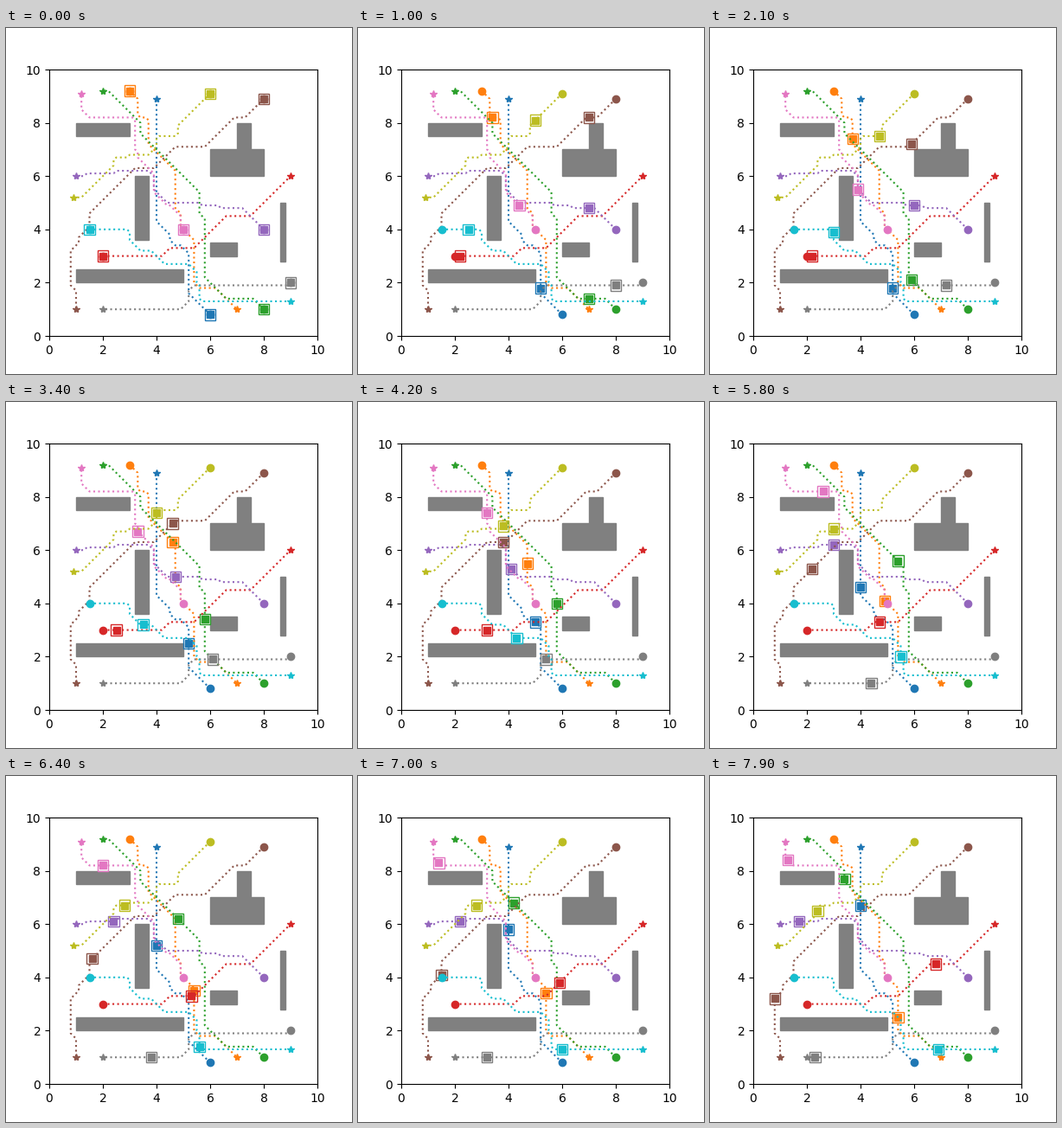
Animation, 400 px wide and 400 px high, one loop 8 s. Source, as a matplotlib script:

```python
import numpy as np
import matplotlib.pyplot as plt
from matplotlib.animation import FuncAnimation
from matplotlib.patches import Rectangle

FRAMES = 80
INTERVAL = 100
CELL = 0.1    # robots move one grid cell per frame
BOX = 0.4

fig, ax = plt.subplots(figsize=(4, 4), dpi=100)
ax.set_xlim(0, 10)
ax.set_ylim(0, 10)

for x, y, w, h in [(1, 7.5, 2, 0.5), (6, 6, 2, 1), (7, 7, 0.5, 1),
                   (3.2, 3.6, 0.5, 2.4), (1, 2, 4, 0.5),
                   (6, 3, 1, 0.5), (8.6, 2.8, 0.2, 2.2)]:
    ax.add_patch(Rectangle((x, y), w, h, color="gray"))


def route(points):
    """Grid cells through the points: diagonal first, then straight."""
    corners = np.rint(np.array(points) / CELL).astype(int)
    cells = [corners[0]]
    for corner in corners[1:]:
        while (cells[-1] != corner).any():
            cells.append(cells[-1] + np.sign(corner - cells[-1]))
    return np.array(cells) * CELL


class Robot:
    """Follows its route, pausing as told by holds: {cell index: frames}."""

    def __init__(self, color, points, holds):
        self.path, self.holds = route(points), holds
        ax.plot(*self.path.T, ":", color=color)
        ax.plot(*self.path[0], "o", color=color)
        ax.plot(*self.path[-1], "*", color=color)
        self.box = ax.add_patch(Rectangle((0, 0), BOX, BOX, fill=False,
                                          edgecolor=color, lw=1, zorder=2))
        self.core, = ax.plot([], [], "s", color=color)

    def move(self, frame):
        step = frame
        for cell, wait in self.holds.items():
            if step > cell:
                step = max(cell, step - wait)
        x, y = self.path[min(step, len(self.path) - 1)]
        self.box.set_xy((x - BOX / 2, y - BOX / 2))
        self.core.set_data([x], [y])


robots = [
    Robot("tab:blue",
          [(6, 0.8), (5.2, 3.1), (4.7, 3.4), (4.5, 3.8), (4, 8.9)],
          {10: 17, 27: 1}),
    Robot("tab:orange",
          [(3, 9.2), (3.3, 8.3), (3.6, 8.2), (3.7, 7.2), (4.7, 4.8),
           (4.9, 4.1), (5.4, 2), (6.2, 1.8), (7, 1)],
          {20: 3, 50: 2, 60: 5}),
    Robot("tab:green",
          [(8, 1), (6.6, 1.4), (5.8, 4.4), (5.6, 5.4), (3.4, 8), (2, 9.2)],
          {36: 2}),
    Robot("tab:red",
          [(2, 3), (4.2, 3), (5.4, 3.3), (7.5, 4.5), (9, 6)],
          {2: 29, 7: 1, 14: 1}),
    Robot("tab:purple",
          [(8, 4), (6.4, 4.8), (5.7, 4.9), (4.4, 5), (3.9, 6),
           (2.5, 6.2), (1.4, 6.1), (1, 6)],
          {10: 1, 35: 2, 63: 8}),
    Robot("tab:brown",
          [(8, 8.9), (6.9, 8.2), (4.7, 7.1), (3.2, 6.3), (1.5, 4.1),
           (1.1, 3.5), (0.8, 1.9), (1, 1)],
          {}),
    Robot("tab:pink",
          [(5, 4), (4.9, 4.5), (4.4, 4.9), (3.9, 6.1), (3.3, 6.9),
           (3.2, 8.1), (1.5, 8.2), (1.2, 9.1)],
          {10: 5, 20: 1, 35: 4, 60: 8}),
    Robot("tab:gray",
          [(9, 2), (5.4, 1.9), (5.2, 1.3), (2, 1)],
          {15: 3, 25: 2, 36: 3}),
    Robot("tab:olive",
          [(6, 9.1), (4.8, 7.6), (4.1, 7.5), (4, 7.1), (3, 6.8),
           (2.5, 6.7), (2.4, 6.4), (0.9, 5.2)],
          {16: 11, 28: 11, 38: 14}),
    Robot("tab:cyan",
          [(1.5, 4), (2.9, 4), (3, 3.6), (3.8, 3.2), (5.2, 2.7),
           (5.5, 2), (5.6, 1.4), (9, 1.3)],
          {15: 11, 57: 2}),
]


def update(frame):
    for robot in robots:
        robot.move(frame)
    return []


anim = FuncAnimation(fig, update, frames=FRAMES, interval=INTERVAL,
                     repeat=True, repeat_delay=0)
plt.show()
```
